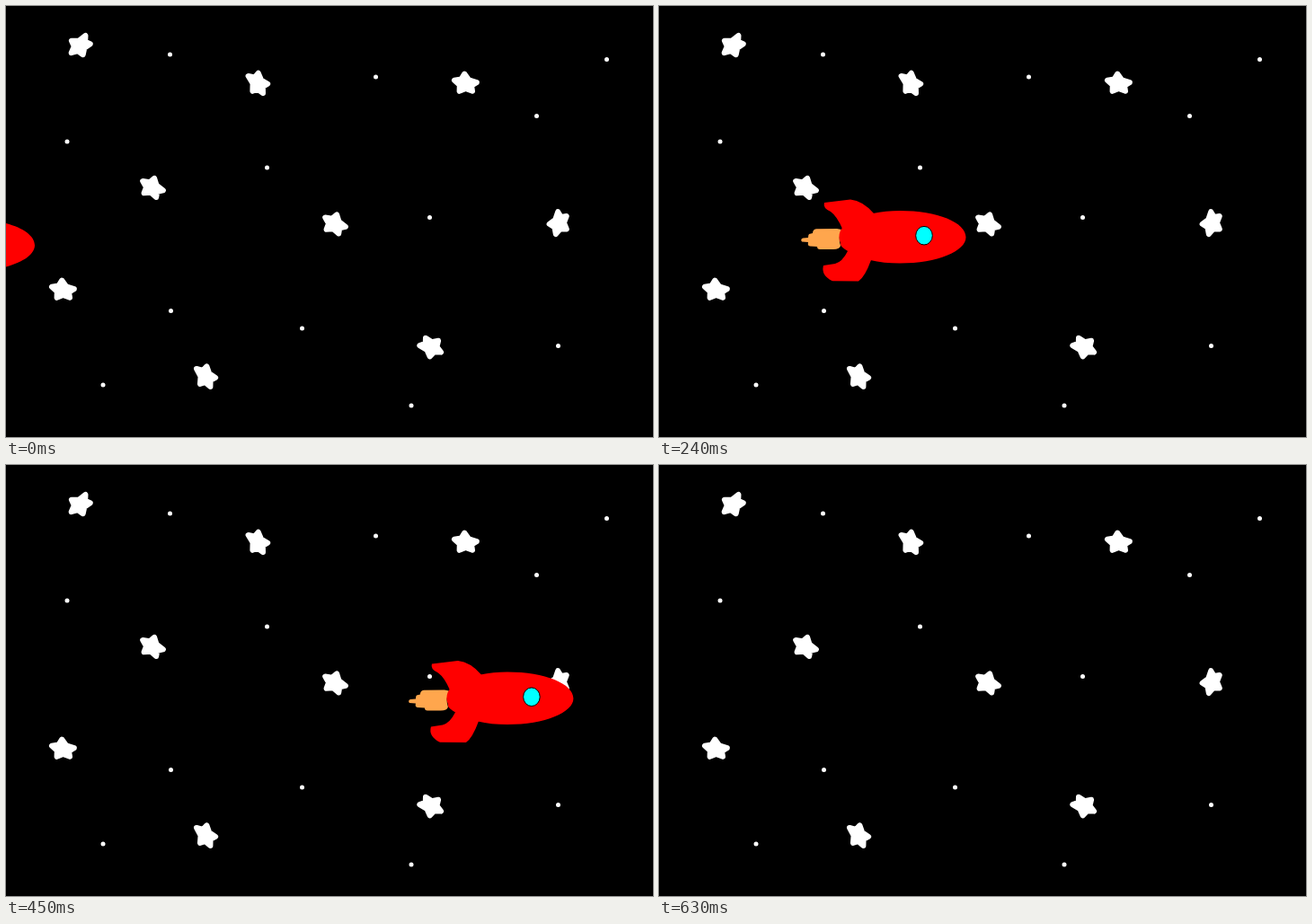
Write an HTML page with a canvas that moves like this. It is 720 by 480 pixels and loops after 870 ms.

```html
<!DOCTYPE html>
<html lang="en">
<head>
<meta charset="utf-8">
<title>Rocket</title>
<style>
  html, body { margin: 0; width: 100%; height: 100%; overflow: hidden; background: #000; }
  canvas { display: block; }
</style>
</head>
<body>
<canvas id="stage" width="720" height="480"></canvas>
<script>
const ctx = document.getElementById('stage').getContext('2d');
const LOOP = 870, STEP = 30, LAST_STEP = 630;

// Star tips relative to the centre, clockwise from the top.
const WIDE = [[-1, -13], [16, -1], [10, 11], [-8, 11], [-15, -4]];
const TALL = [[1, -14], [14, 1], [7.5, 14], [-7, 11], [-13, -10]];

// Shape, x, y, rotation in degrees.
const stars = [
  [WIDE, 82, 44, -56], [TALL, 280, 86, 0], [WIDE, 511, 86, 0],
  [WIDE, 162.5, 202, 19], [WIDE, 365.5, 242.5, 19], [WIDE, 615, 242, -90],
  [WIDE, 63, 316, 0], [WIDE, 473, 380, 192], [TALL, 222, 412.5, 3]
];

const dots = [
  [182.5, 54], [411.5, 79], [668.5, 59.5], [590.5, 122.5], [68, 151], [290.5, 180],
  [471.5, 235.5], [183.5, 339.5], [329.5, 359], [614.5, 378.5], [108, 422], [451, 445]
];

// Time, x offset, y offset of the rocket.
const flight = [
  [0, -179.5, 10], [120, 0, 0], [240, 130, 1], [300, 209.5, 3.5],
  [390, 335.5, 5.5], [510, 507, 1], [630, 697, -2]
];

const body = new Path2D('M74 246Q84 237 108 230Q122 227 138 227C180 227 211.5 240 211.5 256.5' +
  'C211.5 272 180 285.5 138 285.5Q120 285.5 105 282Q88 278 77 270Q71 266 72 263Q69 256 72 249Z');
const fins = new Path2D('M54 218L83 214.5Q97 216 109 230L100 262L74 247Q68 233 61 228Q52 224 54 218Z' +
  'M80 272Q74 284 66 286L53 288Q50 299 63 305.3L92 305.5Q99 301 106 282L100 262Z');
const flame = new Path2D('M73 248L68 247L45 247.3Q41 248 41 252L37 253Q36 254 36 257L30 257.5' +
  'Q27 259 29 261.5L36 262Q35 266 38 266.5L46 267Q46 270 49 270H64Q71 270 72 266Q69 257 73 248Z');

function drawStar([tips, x, y, degrees]) {
  ctx.save();
  ctx.translate(x, y);
  ctx.rotate(degrees * Math.PI / 180);
  ctx.beginPath();
  tips.forEach(([tx, ty], i) => {
    const [nx, ny] = tips[(i + 1) % tips.length];
    ctx.lineTo(tx * 0.8, ty * 0.8);
    ctx.lineTo((tx + nx) * 0.27, (ty + ny) * 0.27);
  });
  ctx.closePath();
  ctx.fill();
  ctx.stroke();
  ctx.restore();
}

function drawSky() {
  ctx.fillStyle = '#000';
  ctx.fillRect(0, 0, 720, 480);
  ctx.fillStyle = ctx.strokeStyle = '#fff';
  ctx.lineWidth = 6;
  ctx.lineJoin = 'round';
  stars.forEach(drawStar);
  for (const [x, y] of dots) {
    ctx.beginPath();
    ctx.arc(x, y, 2.5, 0, Math.PI * 2);
    ctx.fill();
  }
}

function drawRocket(x, y) {
  ctx.save();
  ctx.translate(x, y);
  ctx.fillStyle = '#ffa64d';
  ctx.fill(flame);
  ctx.fillStyle = '#f00';
  ctx.fill(fins);
  ctx.fill(body);
  ctx.beginPath();
  ctx.ellipse(165, 254.7, 9.3, 10.3, 0, 0, Math.PI * 2);
  ctx.fillStyle = '#0ff';
  ctx.fill();
  ctx.strokeStyle = '#000';
  ctx.lineWidth = 1;
  ctx.stroke();
  ctx.restore();
}

function slope(i, axis) {
  const a = flight[Math.max(i - 1, 0)];
  const b = flight[Math.min(i + 1, flight.length - 1)];
  return (b[axis] - a[axis]) / (b[0] - a[0]);
}

// Cubic Hermite curve through the flight points.
function flightAt(time, axis) {
  let i = 0;
  while (i < flight.length - 2 && time >= flight[i + 1][0]) i++;
  const a = flight[i], b = flight[i + 1];
  const span = b[0] - a[0], u = (time - a[0]) / span;
  const ease = u * u * (3 - 2 * u);
  return a[axis] + (b[axis] - a[axis]) * ease +
    span * u * (1 - u) * (slope(i, axis) * (1 - u) - slope(i + 1, axis) * u);
}

function render(now) {
  const time = Math.min(Math.floor((now % LOOP) / STEP) * STEP, LAST_STEP);
  drawSky();
  drawRocket(flightAt(time, 1), flightAt(time, 2));
}

const start = performance.now();
function tick() {
  render(performance.now() - start);
  requestAnimationFrame(tick);
}
tick();
</script>
</body>
</html>
```
